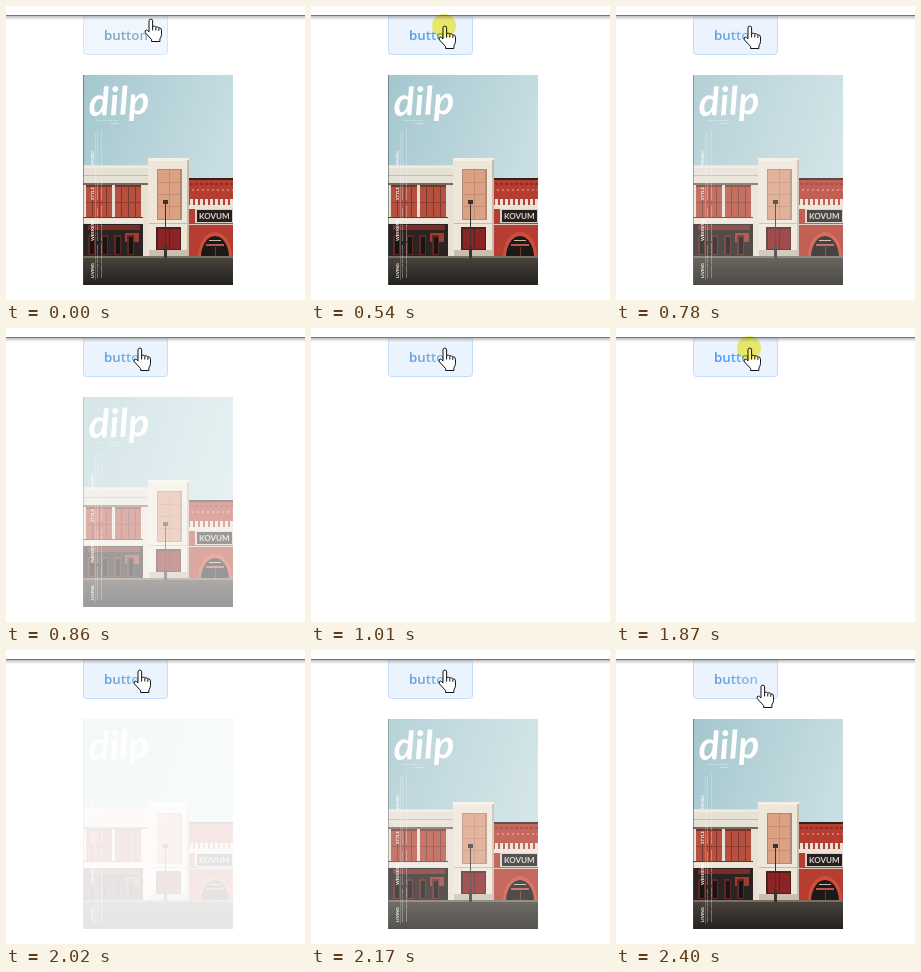
Recreate the animation shown at these times as an HTML page with a canvas. Size 299 px wide and 294 px high, loop 2480 ms.

```html
<!DOCTYPE html>
<html lang="en">
<head>
<meta charset="utf-8">
<title>Fade toggle</title>
<style>
html, body { margin: 0; width: 100%; height: 100%; overflow: hidden; background: #fff; }
canvas { display: block; }
</style>
</head>
<body>
<canvas id="stage" width="299" height="294"></canvas>
<script>
const LOOP = 2480;
const TICKS = [0, 80, 230, 310, 390, 470, 540, 630, 710, 780, 860, 940, 1010,
  1180, 1870, 1940, 2020, 2100, 2170, 2250, 2330, 2400];
const ctx = document.getElementById('stage').getContext('2d');

const box = (g, color, x, y, w, h) => {
  g.fillStyle = color;
  g.fillRect(x, y, w, h);
};

const blend = (g, x0, y0, x1, y1, from, to) => {
  const ramp = g.createLinearGradient(x0, y0, x1, y1);
  ramp.addColorStop(0, from);
  ramp.addColorStop(1, to);
  return ramp;
};

const label = (g, text, x, y, font, color, angle = 0) => {
  g.save();
  g.translate(x, y);
  g.rotate(angle);
  g.font = font;
  g.fillStyle = color;
  g.fillText(text, 0, 0);
  g.restore();
};

const arch = (g, color, x, y, rx, ry) => {
  g.fillStyle = color;
  g.beginPath();
  g.ellipse(x, y, rx, ry, 0, Math.PI, 2 * Math.PI);
  g.fill();
};

function drawLeftHall(g) {
  box(g, '#e6e1d5', 77, 159, 66, 93);
  box(g, '#f0ebe0', 77, 160, 66, 2);
  box(g, '#c3bcae', 77, 169, 66, 1);
  box(g, '#77695f', 77, 177, 66, 2);
  for (const x of [80, 109]) {
    box(g, '#b85040', x, 179, 26, 32);
    box(g, '#7d3028', x, 179, 26, 2);
    for (let i = 6; i < 26; i += 7) box(g, '#7b3a30', x + i, 180, 1, 31);
    box(g, '#8f3c32', x, 196, 26, 1);
  }
  box(g, '#4c423e', 77, 211, 60, 1);
  box(g, '#eee7db', 77, 213, 60, 4);
  box(g, '#2b2321', 77, 218, 60, 33);
  box(g, '#7c2c25', 82, 219, 52, 5);
  box(g, '#a33a2e', 119, 227, 14, 9);
  for (let x = 82; x < 134; x += 13) {
    box(g, '#5d2722', x, 229, 7, 20);
    box(g, '#151515', x + 2, 231, 4, 17);
  }
  box(g, '#e9e1d4', 137, 179, 6, 72);
}

function drawTower(g) {
  box(g, '#eee6d8', 142, 152, 41, 99);
  box(g, '#f5efe4', 142, 152, 41, 3);
  box(g, '#b08a76', 151, 163, 25, 51);
  box(g, '#dba183', 152, 164, 22, 49);
  for (let y = 176; y < 212; y += 12) box(g, '#c68d72', 152, y, 22, 1);
  box(g, '#c68d72', 163, 164, 1, 49);
  box(g, '#c9b9a8', 143, 217, 39, 1);
  box(g, '#4e1f1d', 150, 221, 25, 23);
  box(g, '#8b2425', 152, 223, 22, 20);
  box(g, '#5e1c1c', 163, 223, 1, 20);
  box(g, '#c9bfb0', 143, 244, 40, 7);
  box(g, '#c6baaa', 181, 154, 2, 97);
}

function drawRightHall(g) {
  box(g, '#b53d31', 183, 173, 44, 79);
  box(g, '#33211e', 183, 172, 44, 2);
  for (let x = 184; x < 227; x += 5) {
    box(g, '#8e2d26', x, 177, 3, 2);
    box(g, '#d37566', x + 2, 183, 2, 2);
    box(g, '#ece2d5', x, 193, 3, 7);
  }
  box(g, '#ece2d5', 183, 199, 44, 4);
  box(g, '#d8cfc2', 189, 203, 38, 14);
  box(g, '#25201f', 191, 204, 35, 12);
  label(g, 'KOVUM', 193, 213, 'bold 8px Lato, sans-serif', '#ded8cf');
  box(g, '#dcc9bb', 183, 218, 44, 1);
  arch(g, '#cf4f3c', 209, 251, 17, 25);
  arch(g, '#1d1918', 209, 251, 14, 21);
  box(g, '#b5574a', 200, 238, 18, 2);
  box(g, '#c9b7a8', 203, 234, 12, 1);
  box(g, '#7d302b', 209, 241, 1, 10);
}

function drawLamp(g) {
  box(g, '#3a3330', 159, 195, 1, 56);
  box(g, '#3a3330', 157, 194, 5, 4);
  box(g, '#3a3330', 158, 240, 3, 12);
}

function drawStreet(g) {
  box(g, '#77705f', 77, 250, 150, 2);
  box(g, blend(g, 0, 252, 0, 279, '#47423b', '#24221f'), 77, 252, 150, 27);
}

function drawCoverText(g) {
  label(g, 'dilp', 83, 110, 'italic bold 39px Lato, sans-serif', '#fff', -0.04);
  label(g, 'stories for the road', 91, 115, '2.5px Lato, sans-serif', '#eef5f6');
  label(g, 'number', 104, 118, 'bold 2.5px Lato, sans-serif', '#eef5f6');
  const notes = [['MUSIC', 159], ['STYLE', 194], ['WEEKEND', 235], ['LIVING', 272]];
  for (const [title, y] of notes) {
    label(g, title, 88, y, 'bold 4.5px Lato, sans-serif', '#fff', -Math.PI / 2);
    label(g, 'places to see and hear in town', 92, y, '2.5px Lato, sans-serif', '#e9eeee', -Math.PI / 2);
    label(g, 'new rooms, food and long walks', 96, y, '2.5px Lato, sans-serif', '#e9eeee', -Math.PI / 2);
  }
  box(g, 'rgba(255,255,255,.35)', 89, 126, 0.6, 148);
}

function makeCover() {
  const canvas = document.createElement('canvas');
  canvas.width = 299;
  canvas.height = 294;
  const g = canvas.getContext('2d');
  g.beginPath();
  g.rect(77, 69, 150, 210);
  g.clip();
  box(g, blend(g, 77, 90, 227, 140, '#a5c8cf', '#c9dfe3'), 77, 69, 150, 110);
  drawLeftHall(g);
  drawTower(g);
  drawRightHall(g);
  drawStreet(g);
  drawLamp(g);
  box(g, 'rgba(70,80,80,.55)', 77, 69, 1, 210);
  drawCoverText(g);
  return canvas;
}

const cover = makeCover();
const hand = new Path2D('M5 13V2.4a1.8 1.8 0 0 1 3.6 0V8q2-.9 3.2.5q2-.6 3 .8q2.7-.2 2.7 2.4V16q0 2-1.6 4.3V23H7.6v-2L1.4 14.3q-1-2.4.8-2.8q1.2 0 2.8 2z');
const knuckles = new Path2D('M8.6 8v4M11.8 9v3M14.8 9.8v2.6');

function drawButton(hovered, pressed) {
  ctx.beginPath();
  ctx.roundRect(77.5, 9.5, 84, 39, 3);
  ctx.fillStyle = hovered ? '#ebf3fe' : '#f0f6fd';
  ctx.fill();
  ctx.strokeStyle = hovered ? '#c3ddfa' : '#d3e4f5';
  ctx.stroke();
  const left = pressed ? '#4b98f3' : hovered ? '#5f9bdd' : '#7ba2bd';
  const right = pressed ? '#6bb0f0' : hovered ? '#8fbfe0' : '#8fb2c8';
  label(ctx, 'button', 98, 34, '600 13.333px "Open Sans", sans-serif',
    blend(ctx, 0, 0, 44, 0, left, right));
}

function drawHeader() {
  box(ctx, '#fff', 0, 0, 299, 9);
  box(ctx, '#777', 0, 9, 299, 1);
  box(ctx, blend(ctx, 0, 10, 0, 14, 'rgba(90,90,90,.4)', 'rgba(90,90,90,0)'), 0, 10, 299, 4);
}

function drawHand(x, y) {
  ctx.save();
  ctx.translate(x, y + 0.5);
  ctx.fillStyle = '#fff';
  ctx.fill(hand);
  ctx.strokeStyle = '#111';
  ctx.lineJoin = 'round';
  ctx.stroke(hand);
  ctx.stroke(knuckles);
  ctx.restore();
}

const swing = (t, start) => {
  const p = Math.min(1, Math.max(0, (t - start) / 320));
  return (1 - Math.cos(Math.PI * p)) / 2;
};

const handAt = t => t < 80 ? [138, 12] : t < 2400 ? [127, 19] : [140, 34];

function draw(now) {
  const time = now % LOOP;
  const t = TICKS.findLast(tick => tick <= time);
  const pressed = (t >= 540 && t < 710) || (t >= 1870 && t < 2020);

  box(ctx, '#fff', 0, 0, 299, 294);
  drawButton(t >= 80, pressed);
  drawHeader();
  ctx.globalAlpha = 1 - swing(t, 690) + swing(t, 1950);
  ctx.drawImage(cover, 0, 0);
  ctx.globalAlpha = 1;
  drawHand(...handAt(t));
  if (pressed) {
    // The click highlight tints the hand as well as the button.
    ctx.globalCompositeOperation = 'multiply';
    ctx.fillStyle = '#faf36c';
    ctx.beginPath();
    ctx.arc(133, 20, 12, 0, 2 * Math.PI);
    ctx.fill();
    ctx.globalCompositeOperation = 'source-over';
  }
}

const start = performance.now();
function frame() {
  draw(performance.now() - start);
  requestAnimationFrame(frame);
}
frame();
</script>
</body>
</html>
```
